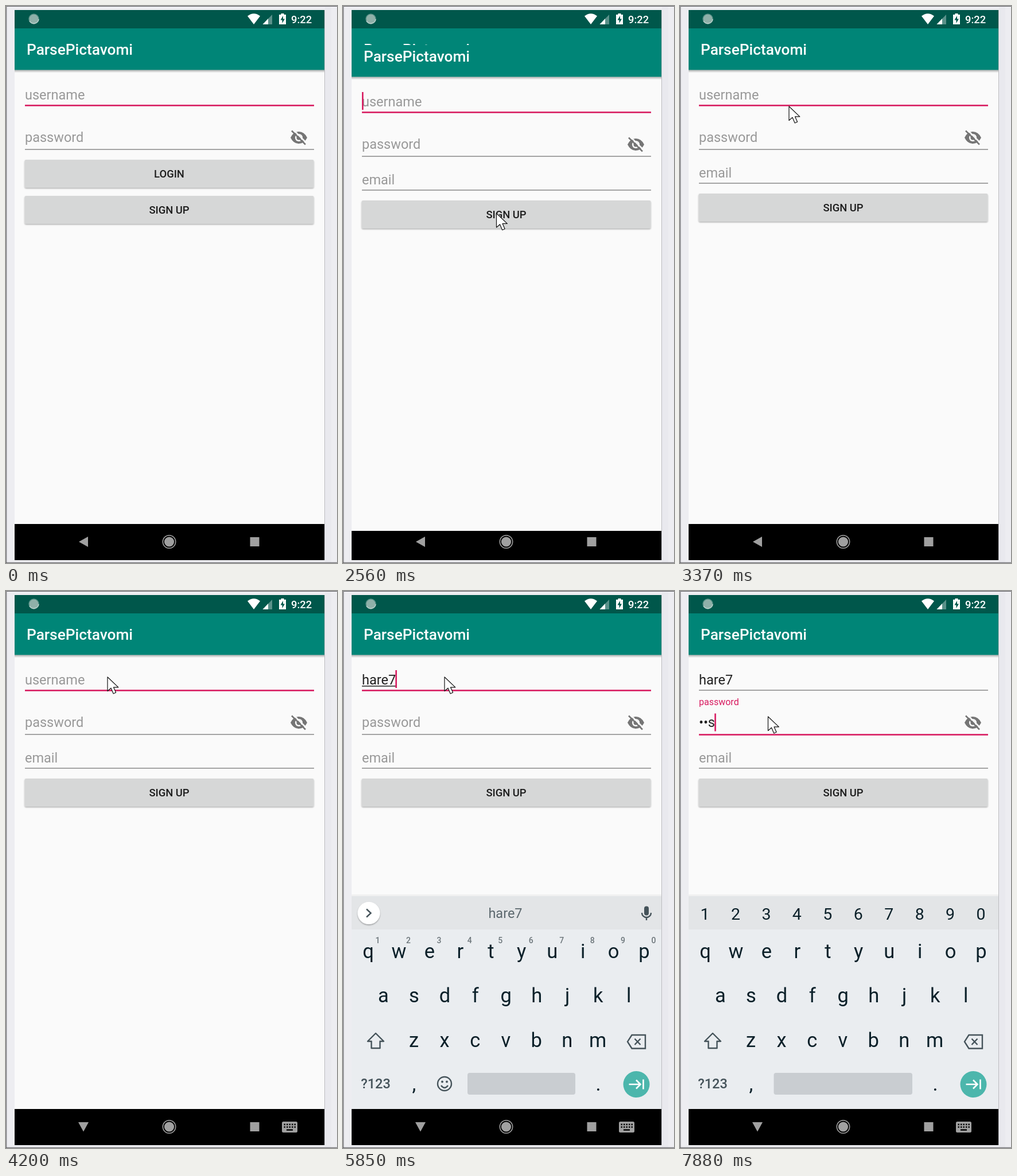
An HTML page for the animation above (8000 ms loop, 577 by 971 pixels).

```html
<!DOCTYPE html>
<html lang="en">
<head>
<meta charset="utf-8">
<title>Sign up demo</title>
<style>
html, body { margin: 0; width: 100%; height: 100%; overflow: hidden; }
svg { display: block; width: 100vw; height: 100vh; font-family: Roboto, sans-serif; }
.field { font-size: 23.5px; }
.hint { fill: #999; }
.entry { fill: #212121; }
.button { font-size: 18.4px; font-weight: 500; fill: #1c1c1c; text-anchor: middle; }
.key { font-size: 34.5px; fill: #0b2029; text-anchor: middle; }
.digit { font-size: 28.5px; fill: #0b2029; text-anchor: middle; }
.super { font-size: 14px; font-weight: 500; fill: #6d767b; text-anchor: middle; }
.suggest { font-size: 23.5px; fill: #5c686e; text-anchor: middle; }
.mode { font-size: 23.5px; font-weight: 500; fill: #45535a; text-anchor: middle; }
.line { fill: none; stroke: #45535a; stroke-width: 2.4; }
</style>
</head>
<body>
<svg viewBox="0 0 577 971" preserveAspectRatio="none">
  <defs>
    <clipPath id="screen"><rect x="15" y="7" width="540" height="959"/></clipPath>
    <clipPath id="reveal"><rect id="revealBox" x="15" y="7" width="540" height="959"/></clipPath>
    <clipPath id="press"><rect x="32.5" y="331" width="504" height="48.5" rx="2.5"/></clipPath>
    <linearGradient id="fade" x2="0" y2="1">
      <stop offset="0" stop-opacity=".3"/><stop offset="1" stop-opacity="0"/>
    </linearGradient>
    <filter id="soft" x="-20%" y="-20%" width="140%" height="150%">
      <feDropShadow dx="0" dy="1.5" stdDeviation="1.2" flood-opacity=".35"/>
    </filter>
  </defs>
  <rect width="577" height="971" fill="#ededf1"/>
  <rect x="556" width="11" height="971" fill="#e9e9ee"/>
  <path d="M.75 971V.5H577M0 970.3H577" fill="none" stroke="#5c5c5f"/>
  <path d="M555.5 7V966" stroke="#bcbcc0"/>
  <g clip-path="url(#screen)">
    <g id="login"></g>
    <rect id="dim" x="15" y="7" width="540" height="959" opacity=".35"/>
    <g id="revealed" clip-path="url(#reveal)"><g id="signup"></g></g>
    <g id="keyboard"></g>
    <g id="system"></g>
  </g>
  <path id="mouse" d="M0 0V24.5L6 19.2L10.2 29L14.6 27L10.6 17.9H18.8Z" fill="#fff" stroke="#111" stroke-width="1.2" stroke-linejoin="round"/>
</svg>
<script>
const LOOP = 8000;
const $ = id => document.getElementById(id);
const text = (x, y, cls, str, id = '') => `<text x="${x}" y="${y}" class="${cls}" ${id && `id="${id}"`}>${str}</text>`;
const rect = (x, y, w, h, fill, more = '') => `<rect x="${x}" y="${y}" width="${w}" height="${h}" fill="${fill}" ${more}/>`;
const path = (d, more = '') => `<path d="${d}" ${more}/>`;
const button = (y, label) => rect(32.5, y, 504, 48.5, '#d6d7d7', 'rx="2.5" filter="url(#soft)"') + text(284.5, y + 31.3, 'button', label);
const underline = (y, id) => rect(33, y, 504, 1.3, '#777', `id="${id}"`);

const eye = `<g fill="#757575">${path('M496 229.5Q501 219 510.5 219T525 229.5Q520 240 510.5 240T496 229.5')}
  <circle cx="510.5" cy="229.5" r="6.6" fill="#fafafa"/><circle cx="510.5" cy="229.5" r="4"/></g>
  ${path('M500.5 215.5L524.5 239.5', 'stroke="#fafafa" stroke-width="2.6"')}
  ${path('M498 217.5L522 241.5', 'stroke="#757575" stroke-width="2.6"')}`;

// One activity window: bars, the two shared fields and its own lower part.
const page = (id, lower) => rect(15, 7, 540, 959, '#fafafa') +
  rect(15, 7, 540, 32, '#00574b') + rect(15, 39, 540, 72.5, '#008577') + rect(15, 111.5, 540, 5, 'url(#fade)') +
  `<text x="36" y="85" fill="#fff" font-size="26.25" font-weight="500">ParsePictavomi</text>` +
  text(33, 163, 'field hint', 'username', id + 'UserHint') + text(33, 163, 'field entry', '', id + 'User') +
  rect(33, 165, 0, 1.5, '#212121', `id="${id}Compose"`) + underline(172.3, id + 'UserLine') +
  text(33, 237, 'field hint', 'password', id + 'PassHint') + text(33, 237, 'field entry', '', id + 'Pass') +
  underline(249.4, id + 'PassLine') + eye + lower +
  rect(33, 138, 2.6, 31, '#d81b60', `id="${id}Caret"`) + rect(15, 903, 540, 63, '#000');

$('login').innerHTML = page('in', button(268, 'LOGIN') + button(331, 'SIGN UP') +
  '<circle id="ripple" cx="270.5" cy="362" opacity=".1" clip-path="url(#press)"/>');
$('signup').innerHTML = page('up', text(33, 299, 'field hint', 'email') + underline(308.3, 'mailLine') + button(327, 'SIGN UP'));

const row = (keys, x, y, cls = 'key', step = 53.45) => [...keys].map((k, i) => text(x + i * step, y, cls, k)).join('');
$('keyboard').innerHTML = rect(15, 529, 540, 3, '#000', 'opacity=".04"') +
  rect(15, 532, 540, 371, '#eaedf0') + rect(15, 532, 540, 58, '#e3e5e7') +
  row('qwertyuiop', 44, 640) + row('asdfghjkl', 70.5, 717) + row('zxcvbnm', 123.5, 795) +
  path('M57 771L71 785H64.5V797H49.5V785H43Z', 'class="line" stroke-linejoin="round"') +
  path('M503.5 774H527V797.5H503.5L496 785.7ZM508.5 780.5L518.5 791M518.5 780.5L508.5 791', 'class="line"') +
  text(57, 867, 'mode', '?123') + text(124, 871, 'key', ',') + text(445, 871, 'key', '.') +
  rect(217, 840, 188, 38, '#c9cdd1', 'rx="4" id="space"') +
  '<circle cx="511.5" cy="860" r="23" fill="#4cb6ac"/>' +
  path('M498.5 860H517M511 852.5L518.5 860L511 867.5M523.5 851.5V868.5', 'fill="none" stroke="#fff" stroke-width="2.6"') +
  `<g id="wordKeys">${row('1234567890', 60.5, 614, 'super')}
    <circle cx="45" cy="561.5" r="19.5" fill="#fff" filter="url(#soft)"/>
    ${path('M41 554.5L48.5 561.5L41 568.5', 'class="line"')}
    ${path('M204.5 546V577M362.5 546V577', 'stroke="#c3c9cc" stroke-width="1.3" id="dividers"')}
    ${[133, 283, 432].map((x, i) => text(x, 570, 'suggest', '', 'word' + i)).join('')}
    ${rect(525, 549.5, 8, 16, '#45535a', 'rx="4"')}
    ${path('M521 561A8 8 0 0 0 537 561M529 569V574', 'class="line"')}
    <circle cx="177" cy="859" r="12" class="line"/>
    ${path('M171 862Q177 870 183 862', 'class="line"')}
    <circle cx="173" cy="855.5" r="1.9" fill="#45535a"/><circle cx="181" cy="855.5" r="1.9" fill="#45535a"/></g>
  <g id="digitKeys">${row('1234567890', 43.5, 573, 'digit')}</g>`;

$('system').innerHTML = '<circle cx="48.5" cy="22.5" r="8.6" fill="#8fb0a9" stroke="#4f8d82" stroke-width="1.4"/>' +
  path('M41 26A8.6 8.6 0 0 0 57 23', 'fill="none" stroke="#c3d6d2" stroke-width="1.4"') +
  path('M421 17.5Q432 9 443 17.5L432 32Z', 'fill="#fff"') +
  path('M447.5 32L464 15V32Z', 'fill="#5a918a"') + path('M447.5 32L457 22V32Z', 'fill="#fff"') +
  path('M476 15H479.5V13H484.5V15H488V32H476Z', 'fill="#fff"') +
  path('M483 17L478.5 24.5H481.5V30L486 22.5H483Z', 'fill="#00574b"') +
  '<text x="497" y="30" fill="#fff" font-size="18.4" font-weight="500">9:22</text>' +
  `<g fill="#a0a0a0">${path('', 'id="back"')}<circle cx="284.5" cy="934" r="8.6"/>
    <circle cx="284.5" cy="934" r="11.2" fill="none" stroke="#a0a0a0" stroke-width="1.5"/>
    ${rect(425.5, 926, 16, 16, '#a0a0a0')}
    <g id="imeIcon">${rect(481, 925, 27, 19, '#a0a0a0', 'rx="2.5"')}
      ${path('M484.5 930H505M484.5 934.5H505', 'stroke="#000" stroke-width="2.4" stroke-dasharray="2.4 2.1"')}
      ${path('M489 939.5H500', 'stroke="#000" stroke-width="2.4"')}</g></g>`;

// Tracks are [start, value] pairs; each value holds until the next start.
const at = (track, t) => track.reduce((held, [start, value]) => t >= start ? value : held, track[0][1]);
const tracks = {
  mouse: [[0, null], [500, [511, 793]], [640, [412, 766]], [920, [345, 640]], [1040, [292, 542]], [1190, [275, 466]],
    [1310, [268, 419]], [1460, [268, 390]], [1610, [267.5, 368]], [1730, [267.5, 361.5]], [3100, [245, 300]],
    [3220, [208, 213]], [3370, [190, 175]], [3490, [179, 155]], [3620, [177, 150]], [6220, [172, 169]],
    [6340, [163, 193]], [6490, [156, 212]], [6610, [153.5, 219]]],
  loginCaret: [[0, 0], [380, 1], [920, 0], [1460, 1], [1850, 0]],
  caret: [[0, 1], [3100, 0], [3620, 1], [4050, 0], [4590, 1], [6340, 0], [6730, 1], [7240, 0], [7490, 1]],
  ripple: [[0, 0], [2130, 30], [2280, 66]],
  clipTop: [[0, 966], [2430, 480], [2560, 68], [2710, 10.5], [2830, 7]],
  pageShift: [[0, 34], [2560, 12], [2710, 4], [2830, 0]],
  keys: [[0, null], [4350, [16, .5]], [4470, [4, .88]], [4590, [0, 1]]],
  user: [[0, ''], [4870, 'h'], [4990, 'ha'], [5270, 'har'], [5580, 'hare'], [5850, 'hare7']],
  words: [[0, 'thanks I we'], [4870, 'have h he'], [4990, 'has ha had'], [5270, 'hard har hare'],
    [5580, 'hard hare hares'], [5850, ' hare7 ']],
  pass: [[0, ''], [7490, 'p'], [7610, '•a'], [7880, '••s']],
  float: [[0, 0], [6730, .5], [6850, 1]]
};

const show = (id, on) => $(id).style.display = on ? '' : 'none';
const set = (id, attrs) => { for (const k in attrs) $(id).setAttribute(k, attrs[k]); };
const focusLine = (id, y, on) => set(id, { y: on ? y - .2 : y, height: on ? 2.6 : 1.3, fill: on ? '#d81b60' : '#777' });

function draw(t) {
  const now = {};
  for (const k in tracks) now[k] = at(tracks[k], t);
  const onPass = t >= 6730, digits = t >= 7120;

  show('mouse', now.mouse);
  if (now.mouse) set('mouse', { transform: `translate(${now.mouse})` });

  show('inCaret', now.loginCaret);
  focusLine('inUserLine', 172.3, true);
  set('ripple', { r: now.ripple });
  show('dim', t >= 2710 && t < 2830);
  show('revealed', t >= 2430);
  set('revealBox', { y: now.clipTop });
  set('signup', { transform: `translate(0 ${now.pageShift})` });

  $('upUser').textContent = now.user;
  $('upPass').textContent = now.pass;
  show('upUserHint', !now.user);
  const userWidth = now.user ? $('upUser').getComputedTextLength() : 0;
  const passWidth = now.pass ? $('upPass').getComputedTextLength() : 0;
  set('upCompose', { width: digits ? 0 : userWidth });
  show('upCaret', now.caret);
  set('upCaret', { x: 33 + (onPass ? passWidth : userWidth) - (now.user ? .8 : 0), y: onPass ? 213.5 : 138 });
  focusLine('upUserLine', 172.3, !onPass);
  focusLine('upPassLine', 249.4, onPass);
  set('upPassHint', { y: 237 - 38 * now.float, style: `font-size:${23.5 - 7.5 * now.float}px;${onPass ? 'fill:#d81b60' : ''}` });

  show('keyboard', now.keys);
  if (now.keys) set('keyboard', { transform: `translate(0 ${now.keys[0]})`, opacity: now.keys[1] });
  show('wordKeys', !digits);
  show('digitKeys', digits);
  set('space', { x: digits ? 163.5 : 217, width: digits ? 241.5 : 188 });
  now.words.split(' ').forEach((word, i) => $('word' + i).textContent = word);
  show('dividers', t < 5850);

  show('imeIcon', t >= 4200);
  set('back', { d: t >= 4200 ? 'M126 926H144L135 942.5Z' : 'M127 934L143 925V943Z' });
}

function tick() {
  draw(performance.now() % LOOP);
  requestAnimationFrame(tick);
}
tick();
</script>
</body>
</html>
```
